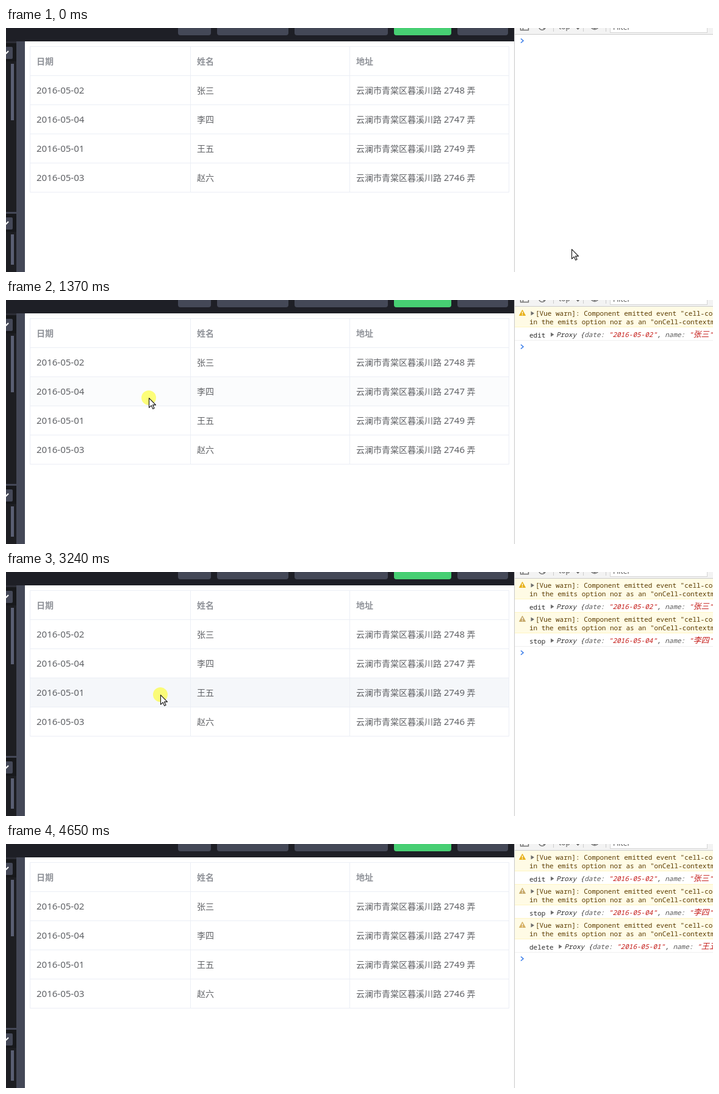
These frames come from a looping animation (1159 px wide and 402 px high, 5.03 s). An HTML page:

```html
<!DOCTYPE html>
<html lang="zh-CN">
<head>
<meta charset="utf-8">
<title>Table context menu</title>
<style>
  html, body { margin: 0; height: 100%; overflow: hidden; background: #fff; }
  svg { display: block; width: 100vw; height: 100vh; }
  text { white-space: pre; font: 14px "Noto Sans", "Noto Sans CJK SC", "Noto Sans CJK", sans-serif; fill: #606266; }
  .head { font-weight: 700; fill: #909399; }
  .date, .num { font-size: 15px; }
  .title { fill: #a9bfbe; }
  .item { fill: #3a4244; }
  .key { font-size: 12.4px; fill: #87999b; text-anchor: end; }
  .on .item, .on .key { fill: #111; }
  .bar { fill: #f6fefd; visibility: hidden; }
  .on .bar { visibility: visible; }
  .log { font: 11px "Noto Sans Mono", "Noto Sans CJK SC", "Noto Sans CJK", monospace; fill: #303030; }
  .warn { fill: #5c3c00; }
  .it { font-style: italic; }
  .prop { fill: #5a5a5a; }
  .str { fill: #c41a16; }
  .cjk { font-size: 13px; }
  .tool { font-size: 12px; fill: #5a5a5a; }
  #menu { filter: drop-shadow(0 1px 2px rgba(0, 0, 0, .5)); }
</style>
</head>
<body>
<svg id="stage" viewBox="0 0 1159 402" preserveAspectRatio="none"></svg>
<script>
const LOOP = 5030;
const NAMES = ['张三', '李四', '王五', '赵六'];
const DATES = ['2016-05-02', '2016-05-04', '2016-05-01', '2016-05-03'];
const LANES = [2748, 2747, 2749, 2746];
const ITEMS = [['编辑', 'Edit'], ['停用', 'Stop'], ['删除', 'Delete']];
const ACTIONS = ['edit', 'stop', 'delete'];

// Tracks: [start, ...values], each value held until the next start
const CURSOR = [
  [0, 'arrow', 927, 364], [210, 'arrow', 235, 143], [440, 'arrow', 187, 110],
  [670, 'arrow', 187, 105], [920, 'arrow', 209, 109], [1150, 'hand', 228, 147],
  [1370, 'arrow', 234, 161], [1620, 'arrow', 232, 159], [1850, 'arrow', 217, 153],
  [2070, 'ban', 237, 158], [2300, 'hand', 265, 207], [2530, 'hand', 263, 210],
  [2760, 'hand', 264, 231], [3010, 'arrow', 269, 224], [3240, 'arrow', 253, 202],
  [3470, 'ban', 268, 222], [3710, 'hand', 290, 301], [3940, 'hand', 292, 311],
  [4190, 'arrow', 311, 309], [4420, 'arrow', 850, 350], [4650, '', 0, 0]
];
const CLICK = [[0, 0], [1370, 1], [1620, 0], [3240, 1], [3470, 0]];
const HOVER = [
  [0, 0, 0], [210, 2, .4], [440, 1, 1], [920, 1, .5], [1150, 0, 0], [1370, 2, .4], [1620, 2, 1],
  [2070, 2, .6], [2300, 0, 0], [3010, 4, .4], [3240, 3, 1], [3470, 3, .5], [3710, 0, 0]
];
// name index (-1 = closed), x, y
const MENU = [
  [0, -1, 0, 0], [920, 0, 188, 106], [1370, -1, 0, 0], [2070, 1, 218, 154],
  [3010, -1, 0, 0], [3470, 2, 254, 203], [4190, -1, 0, 0]
];
const PICK = [[0, -1], [1150, 0], [1370, -1], [2300, 0], [2760, 1], [3010, -1], [3710, 2], [4190, -1]];
const LINES = [
  [0, 0, '#3b7de9'], [920, 1, '#4a86c8'], [1370, 2, '#3b7de9'], [2070, 3, '#8a8f94'],
  [3010, 4, '#3b7de9'], [3470, 5, '#75889c'], [4190, 6, '#3b7de9']
];

const at = (track, t) => track.findLast(step => step[0] <= t).slice(1);

const stage = document.getElementById('stage');
function add(parent, tag, attrs = {}, html = '') {
  const el = document.createElementNS('http://www.w3.org/2000/svg', tag);
  for (const k in attrs) el.setAttribute(k, attrs[k]);
  el.innerHTML = html;
  return parent.appendChild(el);
}
const rect = (p, x, y, width, height, fill, more) => add(p, 'rect', { x, y, width, height, fill, ...more });
const text = (p, x, y, cls, html) => add(p, 'text', { x, y, class: cls }, html);
const path = (p, d, more) => add(p, 'path', { d, fill: 'none', ...more });
const group = (attrs) => add(stage, 'g', attrs);

function drawEditor() {
  const g = group();
  rect(g, 0, 0, 833, 22, '#1e1f26');
  rect(g, 0, 22, 31, 380, '#444857');
  for (const [x, w] of [[282, 54], [346, 117], [473, 153], [636, 94], [740, 83]])
    rect(g, x, -12, w, 24, x === 636 ? '#47cf73' : '#444857', { rx: 4 });
  rect(g, 0, 22, 17, 3, '#2c2d36');
  for (const [y, h, bar] of [[25, 278, 93], [306, 96, 50]]) {
    rect(g, 0, y, 17, h, '#1d1e22');
    rect(g, 0, y, 17, 30, '#17181b');
    rect(g, -8, y + 6, 19, 20, '#444857', { rx: 2 });
    path(g, `M-4 ${y + 13}l4 4 4-4`, { stroke: '#fff', 'stroke-width': 2.2 });
    rect(g, 8, y + 34, 5, bar, '#5a5f73');
  }
}

function drawTable() {
  const g = group();
  for (let i = 0; i < 6; i++) rect(g, 39, 30 + 48 * i, 786, 1, '#ebeef5');
  for (const x of [39, 302, 563, 824]) rect(g, x, 30, 1, 241, '#ebeef5');
  ['日期', '姓名', '地址'].forEach((s, i) => text(g, [50, 313, 574][i], 60, 'head', s));
  NAMES.forEach((name, i) => {
    const y = 108 + 48 * i;
    text(g, 50, y, 'date', DATES[i]);
    text(g, 313, y, '', name);
    text(g, 574, y, '', `云澜市青棠区暮溪川路 <tspan class="num">${LANES[i]}</tspan> 弄`);
  });
}

function drawToolbar() {
  const g = group();
  const line = { stroke: '#6e6e6e', 'stroke-width': 1.4 };
  rect(g, 833, 0, 1, 402, '#c8c8c8');
  rect(g, 834, 0, 325, 10, '#f3f3f3');
  rect(g, 834, 10, 325, 1, '#cccccc');
  path(g, 'M843.5-6V3.5H856.5V-6M847.5-6V3.5', line);
  add(g, 'circle', { cx: 879, cy: -2, r: 5.3, fill: 'none', ...line });
  path(g, 'M875-6L883 2', line);
  for (const x of [897, 946, 983]) rect(g, x, 0, 1, 6, '#cccccc');
  text(g, 906, 2, 'tool', 'top');
  path(g, 'M934-1h7l-3.5 4z', { fill: '#6e6e6e' });
  path(g, 'M958-2q7 9 14 0', line);
  add(g, 'circle', { cx: 965, cy: -1, r: 2.4, fill: '#6e6e6e' });
  rect(g, 990.5, -10, 159, 17.5, '#fff', { stroke: '#d4d4d4' });
  text(g, 995, 3, 'tool', 'Filter');
}

const tri = (p, x, y) => path(p, `M${x} ${y - 3.5}l5.5 3.5-5.5 3.5z`, { fill: '#6e6e6e' });

function warnLine(i) {
  const y = 56 * i, g = group(), tint = ['#e8b21d', '#c6a869', '#d6b163'][i];
  rect(g, 834, y + 10, 325, 35.5, '#fff5c2');
  rect(g, 834, y + 11, 325, 34, '#fffbe5');
  rect(g, 834, y + 45, 325, 1, '#fff');
  rect(g, 834, y + 44, 325, 1, '#fff5c2');
  path(g, `M846.5 ${y + 16.5}l5 9h-10z`, { fill: tint, stroke: tint, 'stroke-linejoin': 'round' });
  path(g, `M846.5 ${y + 19}v3.5m0 1v1.5`, { stroke: '#fff', 'stroke-width': 1.3 });
  tri(g, 860.5, y + 22);
  text(g, 868, y + 26, 'log warn', '[Vue warn]: Component emitted event "cell-contextmenu"');
  text(g, 858, y + 40, 'log warn', 'in the emits option nor as an "onCell-contextmenu" prop.');
  return g;
}

function logLine(i) {
  const y = 56 * i, g = group(), x = 875.6 + ACTIONS[i].length * 6.6;
  rect(g, 834, y + 66, 325, 1, '#f0f0f0');
  text(g, 858, y + 62, 'log', ACTIONS[i]);
  tri(g, x - 9, y + 57);
  text(g, x, y + 61, 'log it',
    `Proxy {<tspan class="prop">date: </tspan><tspan class="str">"${DATES[i]}"</tspan>, ` +
    `<tspan class="prop">name: </tspan><tspan class="str">"<tspan class="cjk">${NAMES[i]}</tspan>"</tspan>}`);
  return g;
}

function drawMenu() {
  const g = group({ id: 'menu' });
  rect(g, 0, 0, 200, 130, '#c9f1f0', { rx: 2 });
  const title = text(g, 10, 25, 'title', '');
  const items = ITEMS.map(([label, key], i) => {
    const item = add(g, 'g', { transform: `translate(0 ${35 + 30 * i})` });
    rect(item, 0, 0, 200, 30, '', { class: 'bar' });
    text(item, 10, 20, 'item', label);
    text(item, 190, 20, 'key', key);
    return item;
  });
  return { g, title, items };
}

function drawCursors() {
  const ink = { fill: '#fff', stroke: '#111', 'stroke-width': 1.1, 'stroke-linejoin': 'round' };
  const arrow = group(), hand = group(), ban = group();
  path(arrow, 'M.5.7V16.3L4.2 12.8 6.7 18.4 9.1 17.3 6.6 11.9H11.5Z', ink);
  path(hand, 'M5.5 14V2.5Q5.5.6 7 .6T8.6 2.5V8Q11.3 6.7 11.7 9 14 8 14.3 10.3 16.3 9.7 16.4 12V16Q16.3 19 14.5 20.5V23.3H6.8V21L1.5 14.5Q.3 12.5 1.8 11.9T5.5 14M8.6 8V12M11.7 9V12.5M14.3 10.3V13', ink);
  add(ban, 'circle', { cx: 8, cy: 8, r: 6.8, fill: '#fff', stroke: '#a81c10', 'stroke-width': 2.3 });
  path(ban, 'M3.3 3.3L12.7 12.7', { stroke: '#a81c10', 'stroke-width': 2.3 });
  return { arrow, hand, ban };
}

const show = (el, on) => el.style.visibility = on ? 'visible' : 'hidden';
const move = (el, x, y) => el.setAttribute('transform', `translate(${x} ${y})`);

const hover = rect(stage, 40, 0, 784, 47, '#f5f7fa');
drawEditor();
drawTable();
const lines = [0, 1, 2].flatMap(i => [warnLine(i), logLine(i)]);
drawToolbar();
const prompt = path(stage, 'M-2-3.5L2 0-2 3.5', { 'stroke-width': 1.6 });
const menu = drawMenu();
const ring = add(stage, 'circle', { r: 12, fill: '#ffff00', opacity: .52 });
const cursors = drawCursors();

function render(t) {
  const [row, alpha] = at(HOVER, t);
  hover.setAttribute('y', 31 + 48 * row);
  hover.setAttribute('opacity', alpha);

  const [count, tint] = at(LINES, t);
  lines.forEach((el, i) => show(el, i < count));
  move(prompt, 846, 21 + 56 * (count >> 1) + 34 * (count % 2));
  prompt.setAttribute('stroke', tint);

  const [who, mx, my] = at(MENU, t), [pick] = at(PICK, t);
  menu.g.style.display = who < 0 ? 'none' : '';
  move(menu.g, mx, my);
  menu.title.textContent = '#' + (NAMES[who] || '');
  menu.items.forEach((el, i) => el.setAttribute('class', i === pick ? 'on' : ''));

  const [kind, x, y] = at(CURSOR, t);
  for (const k in cursors) {
    show(cursors[k], k === kind);
    move(cursors[k], x, y);
  }
  show(ring, at(CLICK, t)[0]);
  move(ring, x, y);
}

const start = performance.now();
function tick() {
  render((performance.now() - start) % LOOP);
  requestAnimationFrame(tick);
}
tick();
</script>
</body>
</html>
```
